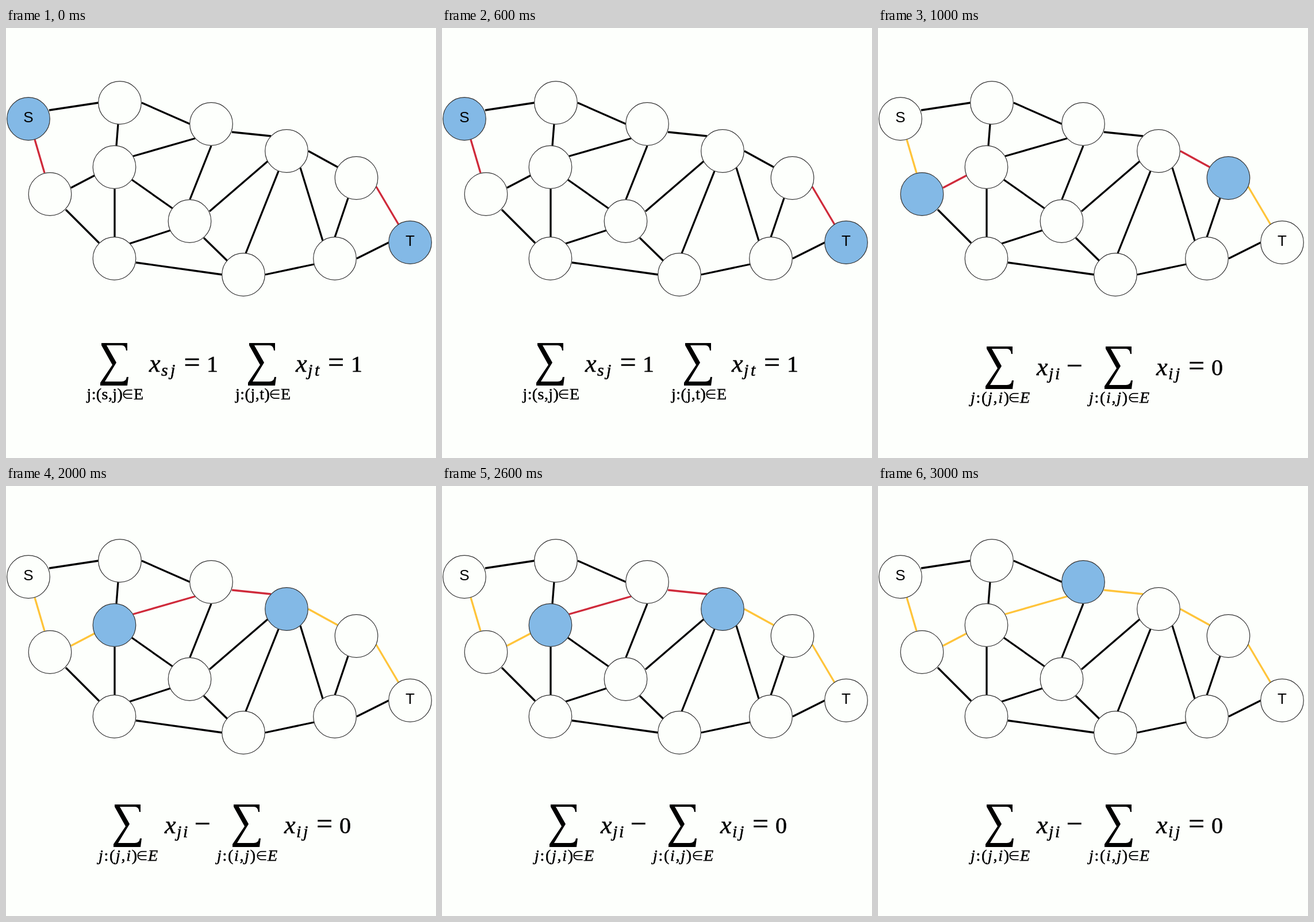
Recreate the animation shown at these times as an HTML page. Size 748 px wide and 748 px high, loop 4000 ms.

```html
<!DOCTYPE html>
<html lang="en">
<head>
<meta charset="utf-8">
<title>Shortest path constraints</title>
<style>
  html, body { margin: 0; width: 100%; height: 100%; overflow: hidden; background: #fdfffc; }
  svg { display: block; width: 100%; height: 100%; }
  line { stroke-width: 3.3; }
  circle { stroke: #333; stroke-width: 1.2; }
  .label { font: 26px "Liberation Sans", Arial, sans-serif; text-anchor: middle; }
  .math { font-family: "Liberation Serif", "Times New Roman", serif; stroke: #000; stroke-width: .5; }
  .in { font-family: "DejaVu Sans", sans-serif; stroke: none; }
  i, .it { font-style: italic; }
</style>
</head>
<body>
<svg viewBox="0 0 748 748">
  <g id="edges"></g>
  <g id="nodes"></g>
  <text class="label" x="39" y="164">S</text>
  <text class="label" x="703" y="379">T</text>
  <g id="ends" class="math"></g>
  <g id="flow" class="math"></g>
</svg>
<script>
const $ = id => document.getElementById(id);

function add(parent, tag, attrs, html = '') {
  const el = document.createElementNS('http://www.w3.org/2000/svg', tag);
  for (const k in attrs) el.setAttribute(k, attrs[k]);
  el.innerHTML = html;
  return parent.appendChild(el);
}

// The path comes first, in pairs that advance from both ends.
const nodes = [
  [39, 158], [703, 373], [76.5, 289], [609.5, 261], [188.5, 242], [488, 214], [357, 167],
  [198, 130], [319.5, 336], [188.5, 401], [413, 429], [572, 401]
].map(([cx, cy]) => add($('nodes'), 'circle', { cx, cy, r: 37.3 }));

const edges = [
  [50, 194, 67, 252], [644, 276, 683, 342],
  [113, 278, 155, 256], [526, 214, 577, 242],
  [221, 223, 329, 192], [393, 181, 461, 188],
  [75, 143, 161, 130], [236, 130, 320, 167], [195, 167, 192, 205],
  [357, 205, 320, 298], [455, 232, 354, 319], [474, 249, 417, 392],
  [512, 243, 551, 370], [595, 296, 572, 364], [610, 401, 666, 373],
  [536, 411, 451, 429], [344, 365, 385, 405], [286, 352, 215, 375],
  [219, 264, 290, 314], [189, 280, 189, 364], [226, 408, 376, 429],
  [104, 316, 162, 374]
].map(([x1, y1, x2, y2]) => add($('edges'), 'line', { x1, y1, x2, y2 }));

const text = (g, s, x, y, size, more) => add(g, 'text', { x, y, 'font-size': size, ...more }, s);
const italic = { class: 'it' };

// A sum sign with its limit; x is the left edge of the limit, y the main baseline.
function sum(g, x, y, limit, sigma, member, spacing, slanted) {
  add(g, 'path', {
    transform: `translate(${sigma} ${y - 50})`, stroke: 'none',
    d: 'M2 0H47V13H45Q44 4 37 4H11L28 34L8 67H37Q45 67 46 59H49L47 74H0V69L21 38L2 4Z'
  });
  const slant = s => slanted ? s.replace(/[a-zE]/g, '<tspan class="it">$&</tspan>') : s;
  text(g, slant(limit), x, y + 48, 28, { 'letter-spacing': spacing });
  text(g, '∈', member - 2.5, y + 47, 23, { class: 'in' });
  text(g, slant('E'), member + 18, y + 48, 28);
}

function variable(g, x, y, a, b, gap) {
  text(g, 'x', x, y, 44, italic);
  text(g, a, x + 21, y + 7, 30, italic);
  text(g, b, x + 21 + gap, y + 7, 30, italic);
}

const ends = $('ends'), flow = $('flow');
sum(ends, 140.5, 598, 'j:(s,j)', 164, 204, .4);
variable(ends, 249, 598, 's', 'j', 16);
text(ends, '=', 309.5, 598, 50);
text(ends, '1', 349, 598, 40);
sum(ends, 399, 598, 'j:(j,t)', 421, 460, .5);
variable(ends, 504, 598, 'j', 't', 12);
text(ends, '=', 560, 598, 50);
text(ends, '1', 600, 598, 40);

sum(flow, 161, 604, 'j:(j,i)', 187, 229, 1.7, true);
variable(flow, 276, 604, 'j', 'i', 11);
text(flow, '−', 327.5, 604, 50);
sum(flow, 367, 604, 'j:(i,j)', 394, 437, 1.7, true);
variable(flow, 484, 604, 'i', 'j', 12);
text(flow, '=', 540, 604, 50);
text(flow, '0', 580, 604, 40);

function draw() {
  const step = Math.floor(performance.now() / 1000) % 4;
  nodes.forEach((n, i) => n.setAttribute('fill', i < 7 && i >> 1 === step ? '#83b9e6' : '#fdfffc'));
  edges.forEach((e, i) => {
    const stage = i >> 1;
    e.setAttribute('stroke', i > 5 || stage > step ? '#000' : stage === step ? '#cf2a3a' : '#ffc43a');
  });
  ends.style.display = step ? 'none' : '';
  flow.style.display = step ? '' : 'none';
  requestAnimationFrame(draw);
}
draw();
</script>
</body>
</html>
```
